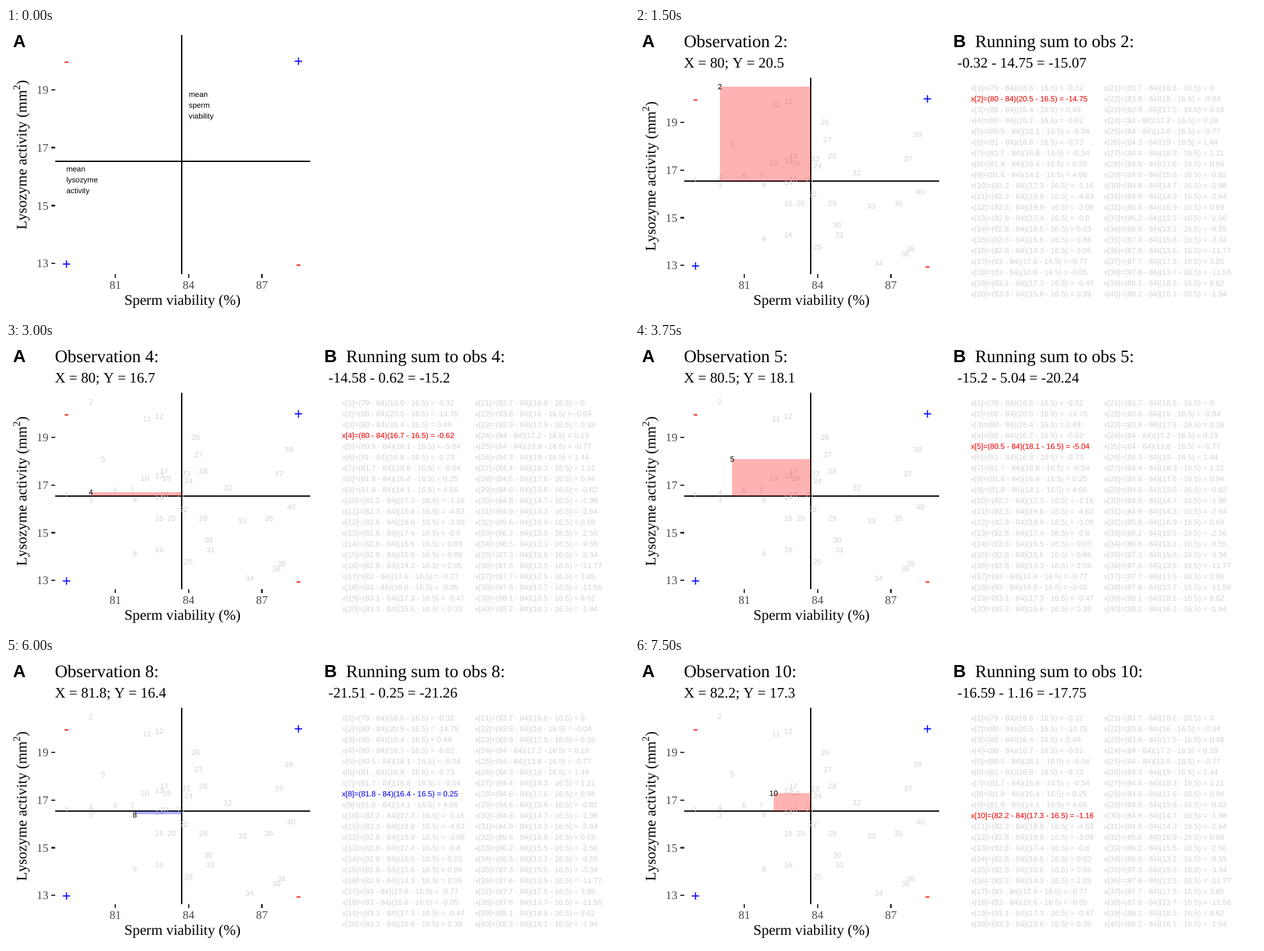
An HTML page for the animation above (8 s loop, 975x450 px).

```html
<!DOCTYPE html>
<html lang="en">
<head>
<meta charset="utf-8">
<style>
  html, body { margin: 0; width: 100%; height: 100%; overflow: hidden; background: #fff; }
  svg { display: block; text-rendering: geometricPrecision; font-kerning: none; }
  path, rect { shape-rendering: crispEdges; }
  .serif { font-family: "Liberation Serif", "Times New Roman", serif; }
  .sans { font-family: "Liberation Sans", Arial, sans-serif; }
</style>
</head>
<body>
<svg id="stage" width="975" height="450" viewBox="0 0 975 450"></svg>
<script>
const STEP = 750, LOOP = 8000;
const TITLE = 27.5, LABEL = 22.92, TICK = 18.33, SMALL = 11.85, SIGN = 23.7;
const LEFT = 76.5, RIGHT = 475.9, BOTTOM = 386.3;
const GREY = '#d3d3d3';

// The measured sample, as "viability: lysozyme ..." groups; everything else is computed from it
const sample = `79: 16.6; 80: 20.5 16.4 16.7; 80.5: 18.1; 81: 16.8; 81.7: 16.8; 81.8: 16.4 14.1;
  82.2: 17.3; 82.3: 19.8; 82.8: 19.9 17.4 16.5 15.6 14.3; 83: 17.6 16.6; 83.1: 17.3; 83.3: 15.6;
  83.7: 16.6; 83.8: 16; 83.9: 17.5; 84: 17.2 13.8; 84.3: 19; 84.4: 18.3; 84.6: 17.6 15.6;
  84.8: 14.7; 84.9: 14.3; 85.6: 16.9; 86.2: 15.5; 86.5: 13.1; 87.3: 15.6; 87.6: 13.5;
  87.7: 17.5; 87.8: 13.7; 88.1: 18.5; 88.2: 16.1`;
const points = sample.split(';').flatMap(group => {
  const [x, ys] = group.split(':');
  return ys.trim().split(' ').map(y => ({ x: +x, y: +y }));
});

const round2 = v => Math.round(v * 100) / 100;
const mean = key => points.reduce((sum, p) => sum + p[key], 0) / points.length;
const meanX = mean('x'), meanY = mean('y');
const product = p => (p.x - meanX) * (p.y - meanY);
const sumOfFirst = n => round2(points.slice(0, n).reduce((sum, p) => sum + product(p), 0));
const signColor = p => product(p) < 0 ? '#f00' : '#00f';

const text = (str, x, y, size, { fill = '#000', anchor = 'start', font = 'sans', extra = '' } = {}) =>
  `<text class="${font}" x="${x}" y="${y}" font-size="${size}" fill="${fill}" text-anchor="${anchor}" ${extra}>${str}</text>`;
const serif = (str, x, y, size, options) => text(str, x, y, size, { font: 'serif', ...options });
const tag = (letter, x) => text(letter, x, 29.7, TITLE, { extra: 'font-weight="700"' });
const centred = (str, x, y, size, fill) => text(str, x, y + size * 0.36, size, { fill, anchor: 'middle' });
const line = (x1, y1, x2, y2, stroke = '#000') =>
  `<path d="M${x1} ${y1}L${x2} ${y2}" stroke="${stroke}" stroke-width="2.22"/>`;
const paragraph = (words, x, y) =>
  words.split(' ').map((word, i) => text(word, x, y + i * 17.06, SMALL)).join('');

const scaleX = v => LEFT + (RIGHT - LEFT) * (0.5 / 11 + (v - 79) / 9.5 / 1.1);
const scaleYFrom = top => v => BOTTOM - (BOTTOM - top) * (0.5 / 11 + (v - 13) / 7.5 / 1.1);

function axes(top, scaleY) {
  const middle = (top + BOTTOM) / 2;
  let out = tag('A', 11);
  for (let v = 81; v <= 87; v += 3) {
    out += line(scaleX(v), BOTTOM, scaleX(v), BOTTOM + 5.73, '#333') +
      serif(v, scaleX(v), 409.2, TICK, { fill: '#4d4d4d', anchor: 'middle' });
  }
  for (let v = 13; v <= 19; v += 2) {
    out += line(LEFT - 5.73, scaleY(v), LEFT, scaleY(v), '#333') +
      serif(v, 66.3, scaleY(v) + 6.2, TICK, { fill: '#4d4d4d', anchor: 'end' });
  }
  out += serif('Sperm viability (%)', 276.2, 434, LABEL, { anchor: 'middle' });
  out += serif('Lysozyme activity (mm<tspan dy="-10" font-size="16">2</tspan><tspan dy="10">)</tspan>',
    0, 0, LABEL, { anchor: 'middle', extra: `transform="translate(32 ${middle}) rotate(-90)"` });
  return out + line(scaleX(meanX), top, scaleX(meanX), BOTTOM) +
    line(LEFT, scaleY(meanY), RIGHT, scaleY(meanY));
}

// A corner is positive when both coordinates lie on the same side of their means
function signs(scaleY) {
  const corner = (x, y) => (x > meanX) === (y > meanY)
    ? centred('+', scaleX(x), scaleY(y), SIGN, '#00f')
    : centred('-', scaleX(x), scaleY(y), SIGN, '#f00');
  return [79, 88.5].map(x => corner(x, 13) + corner(x, 20)).join('');
}

const pointLabel = (p, i, scaleY, fill) => centred(i + 1, scaleX(p.x), scaleY(p.y), SMALL, fill);

const formula = (p, i, fill) =>
  text(`x[${i + 1}]=(${p.x} - 84)(${p.y} - 16.5) = ${round2(product(p))}`,
    i < 20 ? 525.7 : 733.9, 98.2 + (i % 20) * 16.98, SMALL, { fill });

function deviationBox(p, scaleY) {
  const x = scaleX(p.x), y = scaleY(p.y), x0 = scaleX(meanX), y0 = scaleY(meanY);
  return `<rect x="${Math.min(x, x0)}" y="${Math.min(y, y0)}" width="${Math.abs(x - x0)}"
    height="${Math.abs(y - y0)}" fill="${signColor(p)}" fill-opacity=".3"/>`;
}

function intro() {
  const top = 11.46, scaleY = scaleYFrom(top);
  return axes(top, scaleY) + signs(scaleY) +
    paragraph('mean sperm viability', 286, 108) +
    paragraph('mean lysozyme activity', 94.4, 224.6);
}

function observation(n) {
  const top = 78.2, scaleY = scaleYFrom(top);
  const i = n - 1, p = points[i];
  const before = sumOfFirst(i), change = round2(product(p));
  return axes(top, scaleY) +
    points.map((q, j) => pointLabel(q, j, scaleY, GREY) + formula(q, j, GREY)).join('') +
    deviationBox(p, scaleY) + signs(scaleY) +
    pointLabel(p, i, scaleY, '#000') + formula(p, i, signColor(p)) +
    serif(`Observation ${n}:`, LEFT, 29.7, TITLE) +
    serif(`X = ${p.x}; Y = ${p.y}`, LEFT, 62, LABEL) +
    tag('B', 498) +
    serif(`Running sum to obs ${n}:`, 532.2, 29.7, TITLE) +
    serif(`${before} - ${Math.abs(change)} = ${round2(before + change)}`, 504.5, 62, LABEL);
}

const stage = document.getElementById('stage');
const start = performance.now();
let shown = -1;
function draw(now) {
  const step = Math.floor(Math.max(0, now - start) % LOOP / STEP);
  if (step !== shown) {
    stage.innerHTML = step ? observation(step) : intro();
    shown = step;
  }
  requestAnimationFrame(draw);
}
draw(start);
</script>
</body>
</html>
```
